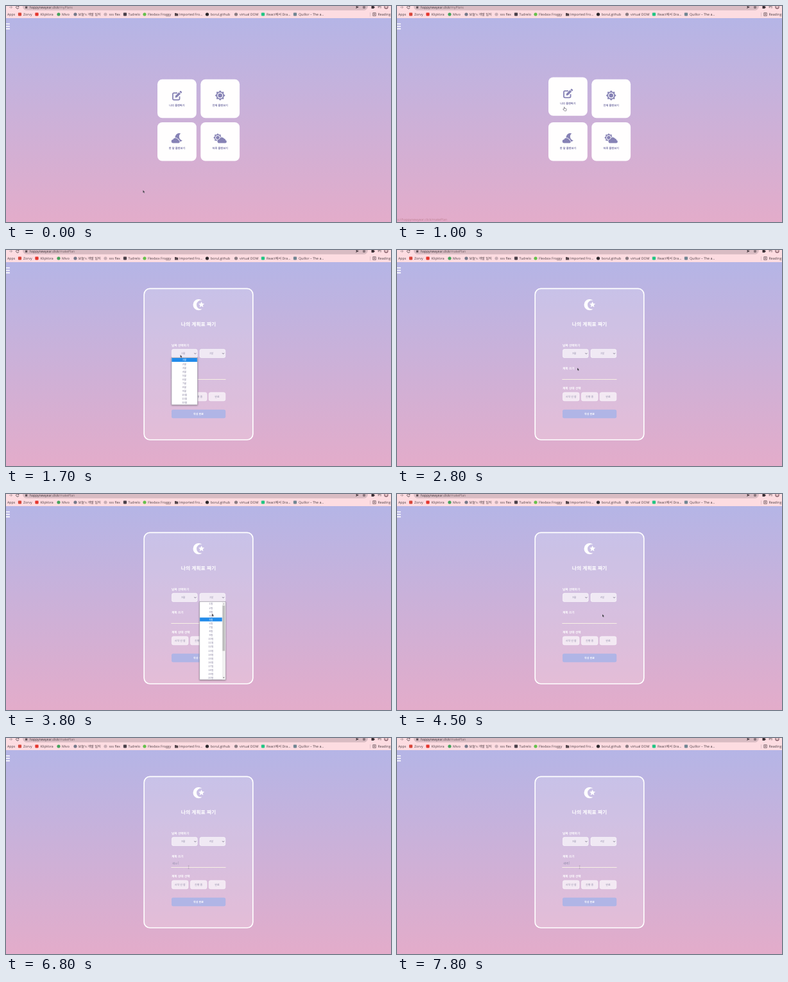
Write an HTML page that moves like this. It is 600x338 px and loops after 8000 ms.

```html
<!DOCTYPE html>
<html lang="ko">
<head>
<meta charset="utf-8">
<title>Plan maker</title>
<style>
html, body { margin: 0; width: 100%; height: 100%; overflow: hidden; }
svg { display: block; width: 600px; height: 338px; }
text { font-family: "Noto Sans CJK KR", "Noto Sans CJK", "Noto Sans", sans-serif; text-rendering: geometricPrecision; white-space: pre; }
.ui { font-family: "Open Sans", "Noto Sans CJK KR", "Noto Sans CJK", sans-serif; }
</style>
</head>
<body>
<svg id="stage" viewBox="0 0 600 338"></svg>
<script>
const PURPLE = '#8682b5';
const LOOP = 8000;

const text = (x, y, s, size, fill, opt = '') =>
  `<text x="${x}" y="${y}" font-size="${size}" fill="${fill}" ${opt}>${s}</text>`;
const mid = (x, y, s, size, fill, opt = '') =>
  text(x, y + size * 0.36, s, size, fill, 'text-anchor="middle" ' + opt);
const rect = (x, y, w, h, fill, r = 0, opt = '') =>
  `<rect x="${x}" y="${y}" width="${w}" height="${h}" rx="${r}" fill="${fill}" ${opt}/>`;
const disc = (x, y, r, fill) => `<circle cx="${x}" cy="${y}" r="${r}" fill="${fill}"/>`;
const path = (d, fill = 'none', opt = '') => `<path d="${d}" fill="${fill}" ${opt}/>`;
const line = (d, color, w) => path(d, 'none', `stroke="${color}" stroke-width="${w}"`);
const group = (id, body, opt = '') => `<g id="${id}" ${opt}>${body}</g>`;
const bold = 'font-weight="700"';

function star(cx, cy, points, outer, inner, fill) {
  const pts = Array.from({ length: points * 2 }, (_, i) => {
    const a = Math.PI * (i / points - 0.5), r = i % 2 ? inner : outer;
    return `${(cx + r * Math.cos(a)).toFixed(2)},${(cy + r * Math.sin(a)).toFixed(2)}`;
  });
  return `<polygon points="${pts.join(' ')}" fill="${fill}"/>`;
}

const sun = (x, y, k = 1) => star(x, y, 8, 8 * k, 5.9 * k, PURPLE) +
  disc(x, y, 4.5 * k, '#fff') + disc(x, y, 3.3 * k, PURPLE);
const cloud = (x, y, k = 1) => path(
  'M-3.5 4a2.9 2.9 0 0 1-.4-5.8a4 4 0 0 1 7.2-.9a2.4 2.4 0 0 1 2.2 2.4a2.2 2.2 0 0 1-.3 4.3z',
  PURPLE, `transform="translate(${x} ${y}) scale(${k})" stroke="#fff" stroke-width="1.4" paint-order="stroke"`);

// browser frame
function bookmark([x, shape, color, tx, label]) {
  const icon = shape === 'o' ? disc(x, 13, 2.6, color) : shape === 's' ? rect(x - 2.6, 10.6, 5.2, 4.8, color, 0.8) : '';
  return icon + text(tx, 14.8, label, 5.25, '#4b3d43', 'class="ui"');
}
const bookmarks = [
  [0, '', '', 2, 'Apps'],
  [21.5, 's', '#d8473c', 27, 'Zorvy'],
  [48, 's', '#e5352d', 53.5, 'KlipVora'],
  [82, 'o', '#45a35c', 87, 'Mivo'],
  [108, 'o', '#75798a', 112.5, '보늘\'s 개발 일지'],
  [155, 'o', '#c9aeb6', 160.5, 'sss flex'],
  [185.5, 's', '#4a414a', 190.5, 'Tudrelo'],
  [216, 'o', '#66c04c', 221, 'Flexbox Froggy'],
  [0, '', '', 270, 'Imported Fro…'],
  [313.5, 'o', '#2d282c', 319, 'borul.github'],
  [358.5, 'o', '#8b7c83', 364, 'virtual DOM'],
  [400.5, 's', '#20c683', 406, 'React에서 Dra…'],
  [450.5, 's', '#718693', 456, 'Quillor – The a…'],
  [0, '', '', 579.5, 'Reading list']
].map(bookmark).join('');

const browser = rect(0, 0, 600, 19, '#fddce1') +
  rect(26, -7, 538, 13.8, '#d9bcc3', 6.5) +
  line('M5 2H9.5M7.5 0L9.5 2L7.5 4', '#a58d94', 0.8) +
  line('M19.6 .6A2.2 2.2 0 1 0 20 2.6M20 -1V1H18', '#4b3d43', 0.8) +
  rect(30, 1, 3.2, 2.8, '#5c4c52', 0.4) + line('M30.7 1V-1H32.5V1', '#5c4c52', 0.6) +
  `<text class="ui" x="37" y="3.8" font-size="5" fill="#3b2f35">happynewyear.click<tspan id="route" fill="#6f5a60"></tspan></text>` +
  path('M545 -.5L550 1.8L545 4L546 1.8Z', '#4b3d43') +
  star(558, 2, 5, 2.8, 1.2, '#4b3d43') + disc(558, 2, 0.8, '#d9bcc3') +
  rect(569.5, 0, 4, 4, '#3b2f35', 0.6) + disc(573.8, 2, 0.9, '#3b2f35') +
  line('M579.5 .5H583M579.5 2.3H582M584 0V3.5', '#4b3d43', 0.7) +
  disc(592.5, 1.5, 3.2, '#8d6670') + disc(592.5, 1.2, 2, '#e7c6c8') +
  path('M263 11H265.3L266 11.7H268.3V15.4H263Z', '#55464c') +
  line('M567.5 10V16.5', '#d2b2ba', 0.6) +
  line('M571.8 10.7H576.3V15.3H571.8ZM573 12H575M573 13.5H575', '#55464c', 0.7) +
  bookmarks;

// menu page
const tile = (id, x, y, icon, label) => group(id,
  rect(x, y, 60.8, 60.4, '#fffefe', 7.5) + icon + mid(x + 30.4, y + 40.6, label, 4.2, '#7976a8', bold));
const pencil =
  line('M267 136.2H261.8Q260 136.2 260 138V145Q260 146.8 261.8 146.8H268.7Q270.5 146.8 270.5 145V141.5', PURPLE, 1.8) +
  path('M263.6 143.4L264 140.6L269.6 135L272.1 137.5L266.4 143.1ZM270.3 134.3L271.4 133.1Q272 132.5 272.7 133.1L273.9 134.3Q274.5 135 273.9 135.6L272.8 136.8Z', PURPLE);
const moon = path('M272.3 199.4A6.6 6.6 0 1 0 274.8 210.4A6.2 6.2 0 0 1 272.3 199.4Z', PURPLE);
const menu =
  tile('lift', 236, 114.8, pencil, '나의 플랜짜기') +
  tile('all', 303.3, 114.8, sun(333.7, 140), '전체 플랜보기') +
  tile('month', 236, 182, moon + cloud(264, 210.8, 0.95), '한 달 플랜보기') +
  tile('day', 303.3, 182, sun(330, 206, 0.85) + cloud(336.4, 210.4, 1.05), '하루 플랜보기') +
  group('status', text(78, 336.3, 'https://happynewyear.click/makePlan', 5, '#bd7f92', 'class="ui" text-anchor="end"'));

// form page
const field = (x, y, w) => rect(x + 0.4, y, w - 0.8, 13.2, '#ffffffa8', 2.6, 'stroke="#ffffffb0" stroke-width=".8"');
const label = (y, s) => text(258, y + 1.7, s, 4.7, '#fff', bold);
const select = (id, x) => field(x, 155.3, 40.6) +
  `<text id="${id}" x="${x + 18.3}" y="163.4" font-size="4" fill="#918ca9" text-anchor="middle"></text>` +
  line(`M${x + 35.4} 161.2l1.5 1.5l1.5-1.5`, '#5f5a70', 0.8);
const choice = (x, s) => field(x, 222.9, 26.4) + mid(x + 13.2, 229.5, s, 4, '#918ca9');
const form =
  rect(215.2, 60.4, 169.6, 236.6, '#ffffff30', 9, 'stroke="#fff" stroke-width="1.7"') +
  path('M305.5 92.4A8.6 8.6 0 1 1 305.5 79A6.9 6.9 0 1 0 305.5 92.4Z', '#fff') +
  star(304.6, 85.6, 5, 4.8, 2.2, '#fff') +
  mid(300, 116.4, '나의 계획표 짜기', 7.8, '#fff', bold) +
  label(149, '날짜 선택하기') + select('monthValue', 258) + select('dayValue', 301.6) +
  label(185.3, '계획 쓰기') + rect(257.3, 202, 85.2, 1, '#f7f0e4') +
  `<text id="typed" x="258.8" y="197.6" font-size="4.7" fill="#918ca9"></text>` +
  rect(259, 193, 0.5, 5, '#a39cb4', 0, 'id="caret"') +
  label(216, '계획 상태 선택') + choice(258, '시작 안 함') + choice(287, '진행 중') + choice(315.8, '완료') +
  rect(258, 249.8, 84.2, 13.4, '#b0b5e6', 2.6) + mid(300, 256.5, '작성 완료', 4, '#fff', bold);

const PITCH = 6.09;
function options(id, x, count, unit, h, scroll) {
  const w = scroll ? 35.2 : 40, cx = x + w / 2;
  let body = rect(x, 168.7, 40.3, h, '#fff', 0, 'stroke="#9b98a3" stroke-width=".6" filter="url(#shade)"') +
    rect(x + 0.3, 169, w - 0.4, 6, '#218bea', 0, `id="${id}Bar"`);
  for (let i = 0; i < count; i++) body += mid(cx, 172 + i * PITCH, i + 1 + unit, 4, '#817c9b');
  if (scroll) body += rect(x + 35, 169, 5, h - 0.6, '#f1f1f1') + rect(x + 35.6, 174.5, 3.8, 71, '#bdbdbd') +
    path(`M${x + 36.3} 172.5l1.2-1.5l1.2 1.5z`, '#999') + path(`M${x + 36.3} 286.8l1.2 1.5l1.2-1.5z`, '#555');
  return group(id, body);
}

const arrow = path('M0 0V4.3L1 3.5L1.7 5L2.5 4.6L1.8 3.2H3.1Z', '#3a3640', 'stroke="#ffffff90" stroke-width=".25"');
const hand = path('M1 3.8V.6Q1.5 -.2 2 .6V2.5L4.4 3Q5 3.2 4.8 4L4.3 6.3H1.6L-.6 3.9Q-.6 3 .2 3.3Z', '#fff', 'stroke="#55505f" stroke-width=".6"');
const beam = line('M-1 -2.4H1M0 -2.4V2.4M-1 2.4H1', '#9d959c', 0.4);

const stage = document.getElementById('stage');
stage.innerHTML = `<defs>
  <linearGradient id="sky" x1="0" y1="0" x2="0" y2="1"><stop stop-color="#b5b5e6"/><stop offset="1" stop-color="#e3acca"/></linearGradient>
  <filter id="shade" x="-20%" y="-20%" width="140%" height="140%"><feDropShadow dx="0" dy=".8" stdDeviation="1" flood-opacity=".4"/></filter>
  </defs>` +
  rect(0, 19, 600, 319, 'url(#sky)') +
  [27.2, 31, 34.8].map(y => rect(-2, y, 8, 1.6, '#fff', 0.5)).join('') +
  group('menu', menu) + group('form', form) +
  options('months', 258, 12, '월', 73.4) + options('days', 301.8, 20, '일', 122, true) +
  browser + group('pointer', group('arrow', arrow) + group('hand', hand) + group('beam', beam));

const $ = id => document.getElementById(id);
const show = (id, on) => $(id).style.display = on ? '' : 'none';

// latest value whose time has come
const step = (rows, t) => rows.reduce((v, r) => t >= r[0] ? r[1] : v, rows[0][1]);
function glide(rows, t) {
  const i = rows.findIndex(r => r[0] > t);
  if (i < 0) return rows[rows.length - 1].slice(1);
  const a = rows[i - 1], b = rows[i], k = (t - a[0]) / (b[0] - a[0]);
  return a.slice(1).map((v, j) => v + (b[j + 1] - v) * k);
}

const moves = [
  [0, 213.4, 288], [100, 185.4, 288], [200, 185.4, 288], [500, 220, 223.5], [600, 220, 223.5],
  [700, 249, 178], [900, 260, 158], [1000, 259.3, 157.8], [1200, 259.3, 157.8], [1400, 271.6, 164],
  [1900, 271.6, 164], [2200, 278, 188], [2300, 278, 188], [2500, 281, 184.2], [2800, 281, 184.2],
  [2900, 297, 172], [3000, 297, 172], [3200, 320, 167], [3500, 320, 167], [3700, 321.5, 193],
  [3800, 321, 187], [4400, 321, 188], [4500, 320, 188], [4900, 284.6, 202.2], [8000, 284.6, 202.2]
];
const lifts = [[0, 0], [700, 0], [1000, -3.4], [8000, -3.4]];
const monthRow = [[0, 1], [2000, 2], [2100, 3], [2200, 4], [2500, 3]];
const dayRow = [[0, 1], [3600, 3], [3700, 5], [3900, 4]];
const typing = [[0, ''], [6300, 'ㅅ'], [6400, '사'], [6500, '새'], [6800, '새ㅂ'], [6900, '새벼'], [7100, '새벽']];
const caretOn = [[0, 0], [5200, 1], [5800, 0], [6300, 1]];

function draw(now) {
  const t = Math.floor(now % LOOP / 100) * 100;
  const onForm = t >= 1200, hover = t >= 800 && !onForm, inField = t >= 4800;
  show('menu', !onForm);
  show('form', onForm);
  show('status', hover);
  $('route').textContent = onForm ? '/makePlan' : '/myPlans';
  $('lift').setAttribute('transform', `translate(0 ${glide(lifts, t)[0]})`);

  show('months', t >= 1600 && t < 2800);
  show('days', t >= 3200 && t < 4500);
  $('monthsBar').setAttribute('y', 169 + (step(monthRow, t) - 1) * PITCH);
  $('daysBar').setAttribute('y', 169 + (step(dayRow, t) - 1) * PITCH);
  for (const [id, row] of [['months', monthRow], ['days', dayRow]])
    $(id).querySelectorAll('text').forEach((el, i) => el.setAttribute('fill', i + 1 === step(row, t) ? '#fff' : '#817c9b'));
  $('monthValue').textContent = (t < 2800 ? 1 : 3) + '월';
  $('dayValue').textContent = (t < 4500 ? 1 : 4) + '일';

  const word = step(typing, t);
  $('typed').textContent = word;
  $('caret').setAttribute('x', 259 + word.length * 4.7 * 0.92 + (word ? 0.6 : 0));
  show('caret', step(caretOn, t));

  const [x, y] = glide(moves, t);
  $('pointer').setAttribute('transform', `translate(${x} ${y})`);
  show('hand', hover);
  show('beam', inField);
  show('arrow', !hover && !inField);
}

const start = performance.now();
function tick() {
  draw(performance.now() - start);
  requestAnimationFrame(tick);
}
tick();
</script>
</body>
</html>
```
